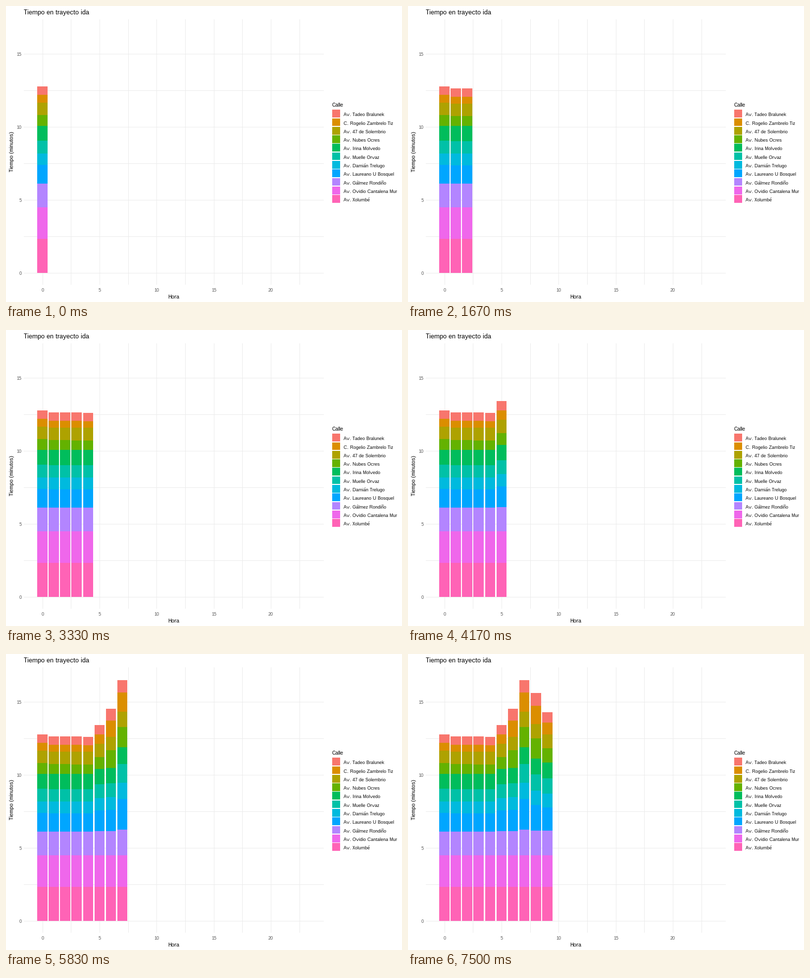
These frames come from a looping animation (800 px wide and 600 px high, 8 s). A matplotlib script:

```python
import numpy as np
import matplotlib.pyplot as plt
from matplotlib.animation import FuncAnimation
from matplotlib.patches import Rectangle

W, H, DPI = 800, 600, 100
LOOP, STEP = 8000, 25            # ms
BAR_DELAY = 2500 / 3             # ms between two bars
HOURS = 10

LEFT, RIGHT, TOP, BOTTOM = 36, 642, 27, 565
X0, UNIT_X = 73.62, 23.07        # pixel of hour 0, pixels per hour
Y0, UNIT_Y = 541, 29.6           # pixel of minute 0, pixels per minute
GRID, TICK = "#EBEBEB", "#4D4D4D"

# Rush hour strength by hour: a long plateau and a short sharp peak.
KEY_HOURS = (0, 1, 4, 5, 6, 7, 8, 9)
RUSH = {
    "long": (0.08, 0.02, 0, 0.24, 0.78, 1, 0.98, 0.45),
    "short": (0.01, 0, 0, 0.18, 0.23, 1, 0.58, 0.42),
}

# Name, colour, minutes on an empty road, extra minutes at the peak, rush.
STREETS = [
    ("Av. Tadeo Bralunek", "#F8766D", 0.57, 0.30, "long"),
    ("C. Rogelio Zambrelo Tiz", "#DB8E00", 0.46, 0.84, "long"),
    ("Av. 47 de Solembrio", "#AEA200", 0.86, 0.20, "short"),
    ("Av. Nubes Ocres", "#64B200", 0.66, 0.72, "long"),
    ("Av. Irina Molvedo", "#00BD5C", 1.03, 0.10, "short"),
    ("Av. Muelle Orvaz", "#00C1A7", 0.86, 0.43, "short"),
    ("Av. Damián Trelugo", "#00BADE", 0.79, 0.34, "short"),
    ("Av. Laureano U Bosquel", "#00A6FF", 1.27, 0.82, "short"),
    ("Av. Gálmez Rondiño", "#B385FF", 1.62, 0.14, "short"),
    ("Av. Ovidio Cantalena Mur", "#EF67EB", 2.16, 0, "short"),
    ("Av. Xolumbé", "#FF63B6", 2.33, 0, "short"),
]

# Whole-pixel glyph spacing without kerning keeps the small text crisp.
plt.rcParams.update({
    "font.family": "Liberation Sans",
    "text.hinting": "no_autohint",
    "text.hinting_factor": 1,
    "text.kerning_factor": 6,
})
fig = plt.figure(figsize=(W / DPI, H / DPI), dpi=DPI, facecolor="white")
ax = fig.add_axes([0, 0, 1, 1])
ax.set_xlim(0, W)
ax.set_ylim(H, 0)
ax.axis("off")


def box(x1, y1, x2, y2, color, z=2):
    """Fill a rectangle whose edges are snapped to whole pixels."""
    x1, y1, x2, y2 = (round(v) for v in (x1, y1, x2, y2))
    return ax.add_patch(Rectangle((x1, y1), x2 - x1, y2 - y1, fc=color, lw=0,
                                  antialiased=False, zorder=z))


def label(x, y, text, px, color="black", ha="left", va="baseline", **kw):
    ax.text(x, y, text, fontsize=px * 72 / DPI, color=color,
            ha=ha, va=va, **kw)


def draw_grid():
    for i in range(10):
        x = round(X0 + 2.5 * i * UNIT_X)
        box(x, TOP, x + 1, BOTTOM, GRID, 1)
        if i % 2 == 0:
            label(x, 579, str(i * 5 // 2), 9, TICK, "center")
    for i in range(7):
        y = round(Y0 - 2.5 * i * UNIT_Y)
        box(LEFT, y, RIGHT, y + 1, GRID, 1)
        if i % 2 == 0:
            label(31.3, y + 4, str(i * 5 // 2), 9, TICK, "right")


def draw_titles():
    label(35.6, 17, "Tiempo en trayecto ida", 13)
    label(338.6, 593, "Hora", 11, ha="center")
    label(11.8, 295, "Tiempo (minutos)", 11, ha="center", va="center",
          rotation=90)


def draw_legend():
    label(658.7, 204, "Calle", 11)
    for i, (name, color, *_) in enumerate(STREETS):
        y = 210.3 + 17.28 * i
        box(659, y, 675, y + 15.74, color)
        label(682, round(y + 13), name, 9)


def draw_bar(hour):
    x = X0 + (hour - 0.45) * UNIT_X
    bottom = Y0
    parts = []
    for _, color, base, extra, rush in reversed(STREETS):
        minutes = base + extra * np.interp(hour, KEY_HOURS, RUSH[rush])
        top = bottom - minutes * UNIT_Y
        parts.append(box(x, top, x + 0.9 * UNIT_X, bottom, color))
        bottom = top
    return parts


draw_grid()
draw_titles()
draw_legend()
bars = [draw_bar(hour) for hour in range(HOURS)]


def update(i):
    end = (i + 1) * STEP
    for hour, bar in enumerate(bars):
        for part in bar:
            part.set_visible(hour * BAR_DELAY < end - 1e-6)
    return []


anim = FuncAnimation(fig, update, frames=LOOP // STEP, interval=STEP,
                     init_func=lambda: update(0), repeat=True,
                     repeat_delay=0, blit=False)
plt.show()
```
